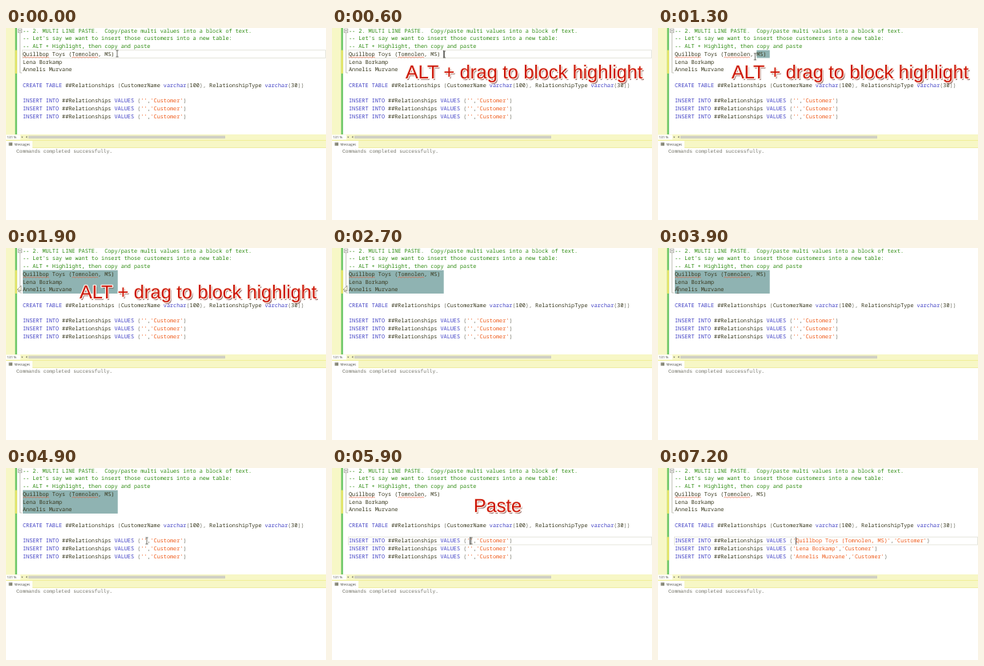
An HTML page that plays this animation: 400 by 240 pixels, repeating every 7300 ms.

```html
<!DOCTYPE html>
<html lang="en">
<head>
<meta charset="utf-8">
<title>Multi line paste</title>
<style>
  html, body { margin: 0; width: 100%; height: 100%; overflow: hidden; background: #fff; }
  svg { display: block; width: 400px; height: 240px; }
  text { white-space: pre; text-rendering: geometricPrecision; }
  .code { font: 6.82px "Noto Sans Mono", "DejaVu Sans Mono", monospace; fill: #3a3a20; }
  .comment { fill: #2f8c12; }
  .word { fill: #4040c4; }
  .str { fill: #ee5c1c; }
  .sign { fill: #77776a; }
  .out { font: 6.25px "Liberation Mono", monospace; fill: #77776c; }
  .ui { font: 4.3px "Open Sans", "Noto Sans", sans-serif; fill: #44443c; }
  .cap { font: 23.5px "Liberation Sans", Arial, sans-serif; }
  .cap .shade { fill: #6b2a22; opacity: .65; }
  .cap .face { fill: #cc1608; stroke: #fff4ec; stroke-width: 2.4px; stroke-linejoin: round; paint-order: stroke; }
</style>
</head>
<body>
<svg viewBox="0 0 400 240">
  <rect width="400" height="240" fill="#fff"/>

  <!-- editor margin -->
  <rect width="12" height="133" fill="#f7f7c6"/>
  <rect x="11.5" width="2.2" height="133" fill="#62c45c"/>
  <rect x="11.5" y="27.7" width="2.2" height="29.2" fill="#f3e96a"/>
  <rect id="edited" x="11.5" y="86.2" width="2.2" height="29.2" fill="#f3e96a"/>
  <path d="M17.5 6V56H20" fill="none" stroke="#b4b4a8" stroke-width=".7"/>
  <rect x="15.2" y="1.2" width="4.6" height="4.6" fill="#fff" stroke="#96968a" stroke-width=".7"/>
  <path d="M16.2 3.5H18.8" stroke="#66665c" stroke-width=".7"/>

  <rect id="line" x="20.5" width="379" height="9.75" fill="none" stroke="#e2e2d8" stroke-width=".8"/>
  <rect id="sel" fill="#8fb3b2"/>
  <g id="code"></g>
  <g id="waves" fill="none" stroke="#e8603c" stroke-width=".6"></g>
  <path id="caret" d="M0 0V9" stroke="#333" stroke-width=".8"/>

  <!-- zoom box, scrollbar, message tab -->
  <rect y="133" width="400" height="17" fill="#f7f7c6"/>
  <rect y="133.5" width="18" height="6" fill="#fff"/>
  <text class="ui" x="1" y="138.2">131 %</text>
  <path d="M19 135.8h2.4l-1.2 1.6zM26.4 134.8v3l-1.7-1.5z" fill="#77776c"/>
  <rect x="28" y="134.6" width="246" height="3.6" fill="#cfcfc4"/>
  <path d="M0 140.5H400" stroke="#f1ef9c"/>
  <rect y="141" width="33" height="9" fill="#fff"/>
  <rect x="3.5" y="143.2" width="4.5" height="4" fill="#8a8a7a"/>
  <text class="ui" x="10.5" y="147">Messages</text>
  <path d="M33 149.6H400" stroke="#ecea9c" stroke-width=".8"/>
  <text class="out" x="13" y="155.6">Commands completed successfully.</text>

  <g id="beam" fill="none" stroke="#55554c" stroke-width=".8">
    <path d="M-1.6 -4H1.6M0 -4V4M-1.6 4H1.6"/>
  </g>
  <path id="arrow" d="M0 0V7L-1.6 5.6L-2.8 8L-3.8 7.5L-2.8 5.2H-5Z" fill="#fffbe0" stroke="#77776c" stroke-width=".6"/>

  <g id="caps" class="cap"></g>
</svg>
<script>
const NS = "http://www.w3.org/2000/svg";
const LOOP = 7300, LEFT = 21, COL = 4.093, ROW = 9.75;
const $ = id => document.getElementById(id);
const colX = c => LEFT + c * COL;
const rowTop = r => r * ROW - 1.55;

function add(parent, tag, attrs, text) {
  const el = document.createElementNS(NS, tag);
  for (const k in attrs) el.setAttribute(k, attrs[k]);
  if (text !== undefined) el.textContent = text;
  parent.appendChild(el);
  return el;
}
const set = (el, attrs) => { for (const k in attrs) el.setAttribute(k, attrs[k]); };
const show = (el, on) => el.setAttribute("visibility", on ? "visible" : "hidden");

// Splits a line into coloured runs.
const TOKENS = /(--.*)|('[^']*')|\b(INSERT|INTO|VALUES|CREATE|TABLE|varchar)\b|([(),]+)|([^'(),\s]+|\s+)/g;
const KINDS = ["", "comment", "str", "word", "sign", ""];
function paint(el, line, plain) {
  el.textContent = "";
  if (plain) { el.textContent = line; return; }
  for (const m of line.matchAll(TOKENS)) {
    const kind = KINDS[m.findIndex((part, i) => i && part !== undefined)];
    add(el, "tspan", kind ? { class: kind } : {}, m[0]);
  }
}

const customers = ["Quillbop Toys (Tomnolen, MS)", "Lena Borkamp", "Annelis Murvane"];
const insert = name => `INSERT INTO ##Relationships VALUES ('${name}','Customer')`;
const script = [
  "-- 2. MULTI LINE PASTE.  Copy/paste multi values into a block of text.",
  "-- Let's say we want to insert those customers into a new table:",
  "-- ALT + Highlight, then copy and paste",
  ...customers, "",
  "CREATE TABLE ##Relationships (CustomerName varchar(100), RelationshipType varchar(30))", "",
  ...customers.map(() => insert(""))
];
const rows = script.map((line, r) => {
  const el = add($("code"), "text", { class: "code", x: LEFT, y: r * ROW + 5.7 });
  paint(el, line, r > 2 && r < 6);
  return el;
});

function wave(from, to, r) {
  let d = `M${colX(from)} ${rowTop(r) + 9.4}`;
  for (let i = 0; i < (to - from) * 2; i++) d += `l${COL / 2} ${i % 2 ? 1 : -1}`;
  add($("waves"), "path", { d });
}
wave(0, 8, 3);
wave(15, 23, 3);

function caption(text, x, y) {
  const g = add($("caps"), "g", {});
  add(g, "text", { class: "shade", x: x + 1.6, y: y + 1.6 }, text);
  add(g, "text", { class: "face", x, y }, text);
  return g;
}
const captions = [
  { el: caption("ALT + drag to block highlight", 92, 63), on: 400, full: 600, off: 2000, gone: 2100 },
  { el: caption("Paste", 177, 55), on: 5700, full: 5900, off: 7000, gone: 7200 }
];

// Pointer path: time, x, y
const path = [
  [0, 139, 32], [100, 139, 32], [600, 140.5, 33], [1100, 140.5, 33],
  [1900, 18, 51], [3800, 18, 51], [4600, 176, 91], [5400, 176, 91],
  [5500, 174, 91], [7300, 174, 91]
];
const clamp = v => Math.max(0, Math.min(1, v));
const ease = p => p * p * (3 - 2 * p);
function pointer(t) {
  const i = Math.max(1, path.findIndex(p => p[0] > t));
  const [a, b] = [path[i - 1], path[i]];
  const p = ease(clamp((t - a[0]) / (b[0] - a[0])));
  return [a[1] + (b[1] - a[1]) * p, a[2] + (b[2] - a[2]) * p];
}

let pasted = null;
function draw(t) {
  const [x, y] = pointer(t);
  const atMargin = x < 21;
  set($("beam"), { transform: `translate(${x} ${y})` });
  set($("arrow"), { transform: `translate(${x + 1} ${y - 4})` });
  show($("beam"), !atMargin && t < 7000);
  show($("arrow"), atMargin);

  // Block selection runs from the far end of the first customer to the pointer.
  const selecting = t >= 1200 && t < 5500;
  show($("sel"), selecting);
  if (selecting) {
    const done = t >= 1900;
    const col = done ? 0 : Math.max(0, Math.round((x - LEFT) / COL));
    const last = done ? 5 : Math.max(3, Math.min(5, Math.floor((y + 1.55) / ROW)));
    set($("sel"), {
      x: colX(col), y: rowTop(3),
      width: Math.max(0, colX(29) - colX(col)), height: rowTop(last + 1) - rowTop(3)
    });
  }

  const below = t >= 5500;
  set($("line"), { y: rowTop(below ? 9 : 3) });
  show($("line"), !selecting);
  set($("caret"), { transform: `translate(${colX(below ? 37 : 29)} ${rowTop(below ? 9 : 3) + .4})` });
  show($("caret"), !selecting && !(t >= 6500 && t < 6800) && (below || t >= 400));

  const now = t >= 7000;
  if (now !== pasted) {
    pasted = now;
    customers.forEach((name, i) => paint(rows[9 + i], insert(now ? name : "")));
    show($("edited"), now);
  }

  for (const c of captions) {
    const rise = clamp((t + 100 - c.on) / (c.full + 100 - c.on));
    const fall = clamp((t + 100 - c.off) / (c.gone + 100 - c.off));
    set(c.el, { opacity: rise * (1 - fall) });
  }
}

const start = performance.now();
function tick() {
  const t = (performance.now() - start) % LOOP;
  draw(Math.floor(t / 100) * 100);
  requestAnimationFrame(tick);
}
tick();
</script>
</body>
</html>
```
